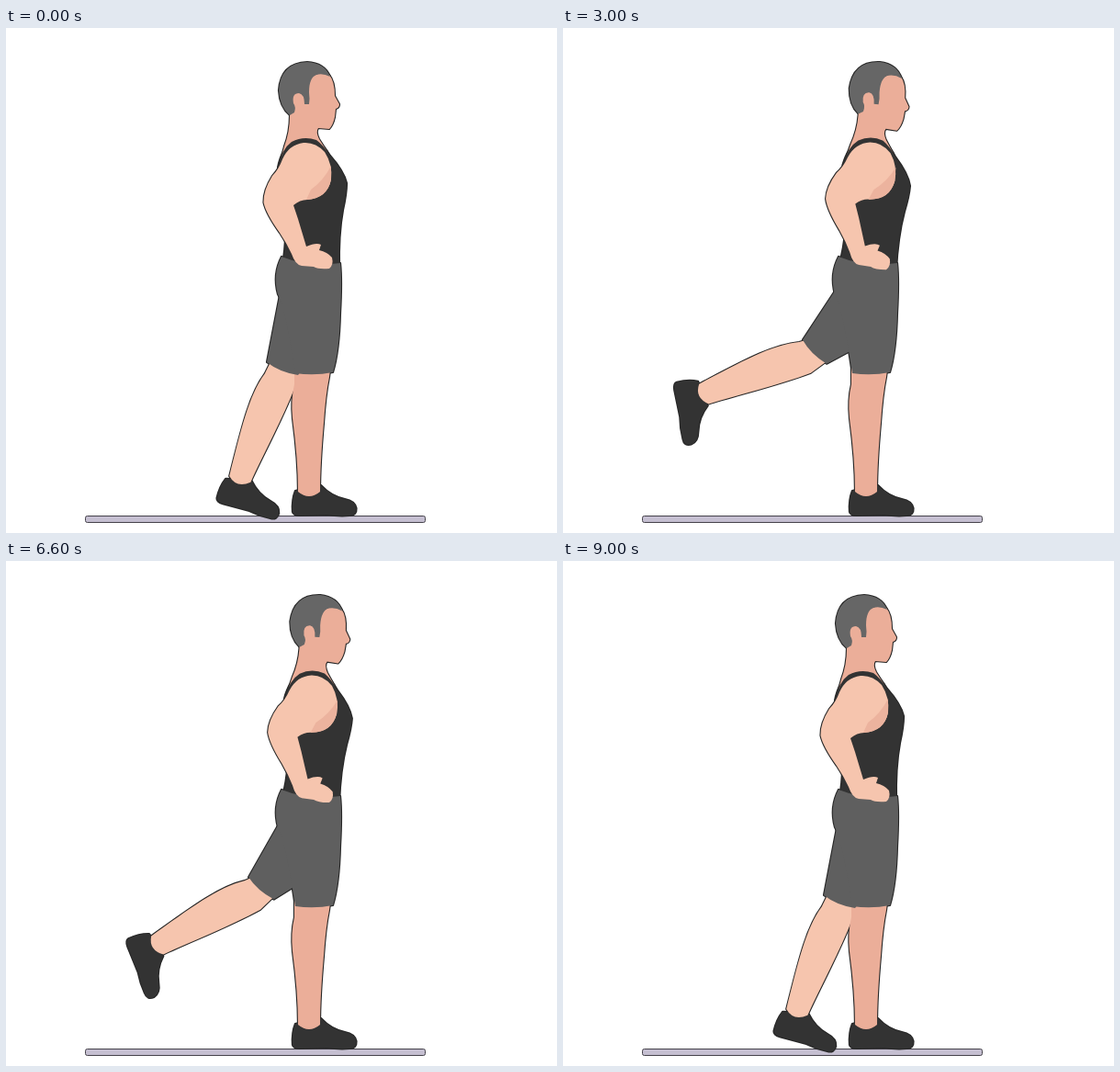
Animation of 600x550 px, one loop 9600 ms. Source, as an HTML page with a canvas:

```html
<!DOCTYPE html>
<html lang="en">
<head>
<meta charset="utf-8">
<title>Standing leg raise</title>
<style>
html, body { margin: 0; width: 100%; height: 100%; overflow: hidden; background: #fff; }
canvas { display: block; }
</style>
</head>
<body>
<canvas id="stage" width="600" height="550"></canvas>
<script>
const ctx = document.getElementById('stage').getContext('2d');
const STEP = 600;
const LIGHT = '#f6c5ae', DARK = '#ebae99', BLACK = '#333', GREY = '#5f5f5f';

// How far the leg is raised at each step; the loop goes up and comes back.
const lift = [0, 0.08, 0.21, 0.52, 0.66, 0.79, 0.91, 1];

const shoe = new Path2D('M-15 2Q-19 12 -18 25Q-17 29 -10 29L20 28Q32 30 44 29Q52 29 51.5 21Q50 13 39 11Q24 8 13 -4L0 -2Z');
const calf = new Path2D('M-14 -10L-16 12C-24 40 -18 80 -12 130Q0 140 12 128C14 95 20 50 20 12L14 -10Z');
const thigh = new Path2D('M340 275L300 280L297 296L284 364Q298 375 318 378L336 356Z');
const leg = new Path2D('M314 365L314 388Q310 405 312 425Q318 470 318 505Q330 515 342 505Q342 475 346 430Q348 400 352 380L354 365Z');
const shorts = new Path2D('M300 249Q330 261 364 256Q366 275 364 310Q363 352 356 375Q336 379 315 376L310 345Q302 300 296 290Q290 268 300 249Z');
const head = new Path2D('M330 56Q340 46 352 51Q358 58 358 74L363 83Q363 87 359 88L358 97Q356 106 352 110L340 109Q337 113 341 121L350 135L300 140L303 129Q309 113 309 96L309 75Z');
const hair = new Path2D('M353 53Q347 38 328 37Q299 38 297 68Q298 86 309 95L314 92Q316 86 313 82Q311 71 319 71Q325 72 325 83L330 83Q331 77 330 70Q330 54 338 51Q345 49 353 53Z');
const vest = new Path2D('M296 152Q300 132 311 124Q324 117 338 122Q346 128 353 139Q368 156 371 169Q371 180 367 198Q362 225 363 262L301 256Q304 243 304 225Z');
const arm = new Path2D('M324 125Q308 127 301 143Q297 154 290 161Q280 177 280.5 190Q283 202 298 223Q306 235 311 246Q315 258 322 259L335 260Q340 263 352 262Q357 258 355 250Q350 244 341 242L343 236Q338 233 327 238L318 208L313 193Q320 187 328 187Q350 185 354 165Q356 149 347 135Q337 124 324 125Z');
const shade = new Path2D('M354 150Q346 166 332 176L327 187Q350 186 354 165Z');

const still = new DOMMatrix();
const turn = (x, y, angle) => still.translate(x, y).rotate(angle);

function drawGround() {
  ctx.beginPath();
  ctx.roundRect(86.5, 531.5, 370, 7, 2);
  ctx.fillStyle = '#c5bfd1';
  ctx.fill();
  ctx.lineWidth = 1;
  ctx.strokeStyle = '#45424a';
  ctx.stroke();
}

function drawBody(raise) {
  // The thigh turns about the hip; shin and foot hang from knee and ankle.
  const hip = turn(333.5, 294, 28.5 * raise).translate(-333.5, -294);
  const knee = hip.transformPoint({ x: 301, y: 371 });
  const shin = turn(knee.x, knee.y, 21 + 61 * raise);
  const ankle = shin.transformPoint({ x: 0, y: 131 });
  const foot = turn(ankle.x, ankle.y, 17 + 80 * raise);
  const torso = turn(335, 262, 5.5 * raise).translate(-335, -262);

  const parts = [
    [shoe, BLACK, foot],
    [calf, LIGHT, shin],
    [shoe, BLACK, still.translate(330, 502)],
    [leg, DARK, still],
    [head, DARK, torso],
    [vest, BLACK, torso],
    [hair, '#666', torso],
    [thigh, GREY, hip],
    [shorts, GREY, still],
    [arm, LIGHT, torso],
    [shade, '#ecb39e', torso]
  ];

  // Outlines go below every fill, so only the silhouette keeps its line.
  ctx.lineWidth = 2.2;
  ctx.lineJoin = 'round';
  ctx.strokeStyle = '#262626';
  for (const [path, , matrix] of parts) {
    ctx.setTransform(matrix);
    ctx.stroke(path);
  }
  for (const [path, color, matrix] of parts) {
    ctx.setTransform(matrix);
    ctx.fillStyle = color;
    ctx.fill(path);
  }
  ctx.resetTransform();
}

function frame() {
  const steps = 2 * lift.length;
  const step = Math.floor(performance.now() / STEP) % steps;
  ctx.fillStyle = '#fff';
  ctx.fillRect(0, 0, 600, 550);
  drawGround();
  drawBody(lift[Math.min(step, steps - 1 - step)]);
  requestAnimationFrame(frame);
}
frame();
</script>
</body>
</html>
```
